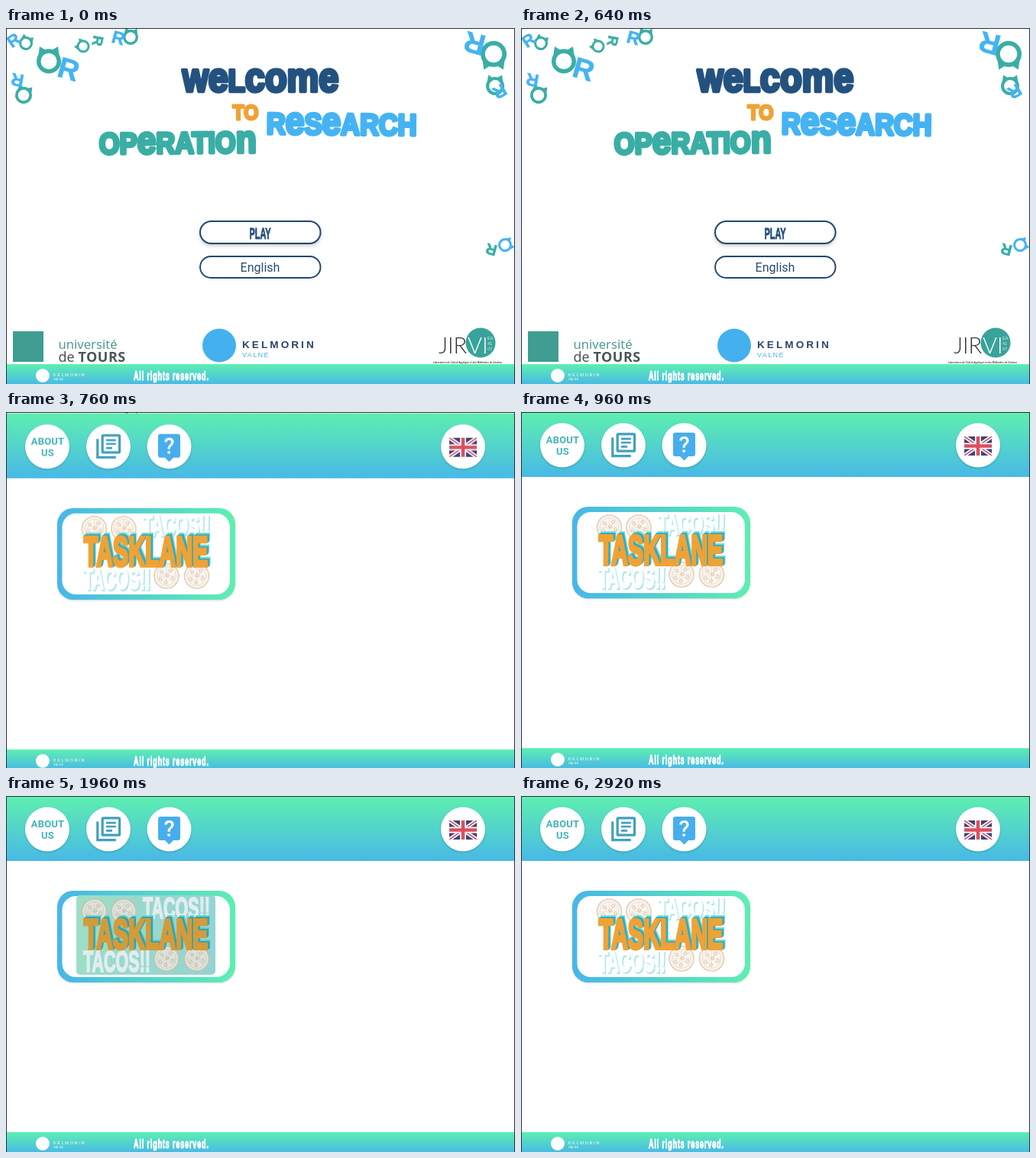
These frames come from a looping animation (666x466 px, 2960 ms). An HTML page:

```html
<!DOCTYPE html>
<html lang="en">
<head>
<meta charset="utf-8">
<title>Welcome</title>
<style>
  html, body { margin: 0; width: 100%; height: 100%; overflow: hidden; background: #fff; }
  svg { display: block; }
  text { font-family: "Liberation Sans", Arial, sans-serif; font-weight: 700; }
  .roboto { font-family: Roboto, sans-serif; }
  .noto { font-family: "Noto Sans", sans-serif; font-weight: 400; }
  .thin { font-family: Lato, sans-serif; font-weight: 300; }
  .plain { font-weight: 400; }
  .display { text-anchor: middle; stroke-linejoin: round; }
  .display .low { font-size: 1.3em; }
  .mid { text-anchor: middle; }
  .lift { filter: drop-shadow(0 1px 1px rgba(0, 0, 0, .22)); }

  .menu { animation: slide 2960ms infinite, appear 2960ms linear infinite; }
  .tint { animation: tint 2960ms linear infinite; }
  .glow { animation: glow 2960ms step-end infinite; }

  @keyframes slide {
    0%, 21.96% { transform: translateY(40px); animation-timing-function: cubic-bezier(.36, .66, .04, 1); }
    28.72%, 100% { transform: none; }
  }
  @keyframes appear {
    0%, 21.96% { opacity: 0; }
    24.6%, 100% { opacity: 1; }
  }
  @keyframes tint {
    0%, 59.5% { opacity: 0; }
    63.5%, 71.6% { opacity: 1; }
    76.4%, 100% { opacity: 0; }
  }
  @keyframes glow {
    0% { opacity: 0; }
    77% { opacity: 1; }
    92% { opacity: 0; }
  }
</style>
</head>
<body>
<svg width="666" height="466" viewBox="0 0 666 466">
  <defs>
    <linearGradient id="bar" x2="0" y2="1">
      <stop stop-color="#5eefb0"/><stop offset="1" stop-color="#48b9e6"/>
    </linearGradient>
    <linearGradient id="rim">
      <stop stop-color="#48b6e8"/><stop offset="1" stop-color="#5eefb0"/>
    </linearGradient>
    <linearGradient id="wash">
      <stop stop-color="#b0eed4"/><stop offset="1" stop-color="#a6e2e6"/>
    </linearGradient>
    <g id="footer">
      <rect x="1" y="440" width="664" height="27" fill="url(#bar)"/>
      <g fill="#fff">
        <circle cx="48" cy="455" r="9"/>
        <text class="plain" x="62" y="456" font-size="5.6" letter-spacing="1.6">KELMORIN</text>
        <text class="plain" x="62" y="460.5" font-size="3.6" letter-spacing=".4">VALNE</text>
      </g>
    </g>
    <g id="pizza">
      <circle r="16" fill="#fbf5ee" stroke="#e3cfba" stroke-width="1.6"/>
      <circle r="12.5" fill="none" stroke="#ecdccb"/>
      <path d="M-12 0H12M0-12V12M-9-9 9 9M9-9-9 9" stroke="#ecdccb" stroke-width=".8"/>
      <g fill="none" stroke="#d9c5b2">
        <circle cx="-6" cy="-5" r="2"/><circle cx="5" cy="-7" r="2"/><circle cx="8" cy="3" r="2"/>
        <circle cx="-1" cy="8" r="2"/><circle cx="-8" cy="4" r="2"/><circle cx="1" cy="-1" r="2"/>
      </g>
    </g>
  </defs>
  <rect width="666" height="466" fill="#fff"/>

  <g id="home">
    <g id="letters"></g>
    <g id="title"></g>
    <g fill="#fff" stroke="#24486f" stroke-width="2">
      <rect x="254" y="253" width="157.5" height="29" rx="14.5" style="filter:drop-shadow(0 2px 2px rgba(0,0,0,.22))"/>
      <rect x="254" y="299" width="157.5" height="28" rx="14"/>
    </g>
    <text class="roboto mid plain" x="332.5" y="319" font-size="16" fill="#2a4a70">English</text>

    <rect x="9" y="397" width="40" height="40" fill="#3f9d91"/>
    <text class="noto" x="68.5" y="420" font-size="16.6" fill="#4d9b91">université</text>
    <text class="noto" x="68.5" y="436.5" font-size="18" fill="#4a5559">de <tspan font-weight="600" letter-spacing=".5">TOURS</tspan></text>

    <circle cx="279" cy="415.5" r="22" fill="#45b0ee"/>
    <text x="309" y="419" font-size="13.5" letter-spacing="3.1" fill="#28456a">KELMORIN</text>
    <text class="plain" x="309" y="431" font-size="9" letter-spacing="1.4" fill="#4bb3ea">VALNE</text>

    <circle cx="621" cy="412" r="19.5" fill="#38a39b"/>
    <g font-size="29">
      <text class="thin" x="566" y="426" fill="#333">JIR</text>
      <text class="thin" x="604" y="426" fill="#fff">VI</text>
    </g>
    <g fill="#d8f0ec" font-size="5.5">
      <text class="plain" x="630" y="408">EA</text><text class="plain" x="630" y="415">41</text>
      <text class="plain" x="630" y="422">07</text>
    </g>
    <text class="mid" x="604" y="438.5" font-size="3.2" fill="#444">Laboratoire de Calcul Appliqué et des Méthodes de Gestion</text>
    <use href="#footer"/>
  </g>

  <g class="menu">
    <rect x="1" width="664" height="467" fill="#fff"/>
    <rect x="1" width="664" height="85" fill="url(#bar)"/>
    <g fill="#fff" class="lift">
      <circle cx="54" cy="43.5" r="29"/><circle cx="134" cy="43.5" r="29"/>
      <circle cx="213.5" cy="43.5" r="29"/><circle cx="598" cy="43.5" r="29"/>
    </g>
    <g class="mid" font-size="13" letter-spacing=".2" fill="#43b5bb">
      <text class="roboto" x="54.5" y="41">ABOUT</text><text class="roboto" x="54.5" y="56">US</text>
    </g>
    <g transform="translate(115 24) scale(1.6)" fill="none" stroke="#419fc0" stroke-width="2">
      <path d="M3 6V21H18"/>
      <rect x="7" y="3" width="14" height="14" rx=".8"/>
      <path d="M10 7H18M10 10H18M10 13.4H15" stroke-width="1.7"/>
    </g>
    <path d="M202 27H225Q228 27 228 30V55Q228 58 225 58H219L213.5 63.5 208 58H202Q199 58 199 55V30Q199 27 202 27Z" fill="#47aeee"/>
    <text class="roboto mid" x="213.5" y="53" font-size="29" fill="#fff" style="font-weight:500">?</text>

    <svg x="580" y="32" width="36" height="25" viewBox="0 0 36 25">
      <rect width="36" height="25" fill="#3c437f"/>
      <path d="M0 0 36 25M36 0 0 25" stroke="#fff" stroke-width="5"/>
      <path d="M0 0 36 25M36 0 0 25" stroke="#d9505f" stroke-width="1.7"/>
      <path d="M18 0V25M0 12.5H36" stroke="#fff" stroke-width="8"/>
      <path d="M18 0V25M0 12.5H36" stroke="#d9505f" stroke-width="4.6"/>
    </svg>

    <rect class="glow" x="67" y="124" width="233" height="120" rx="21" fill="#fff" style="filter:drop-shadow(0 1px 3px rgba(0,0,0,.45))"/>
    <rect x="67" y="124" width="233" height="120" rx="21" fill="url(#rim)" style="filter:drop-shadow(0 1px 1px rgba(0,0,0,.15))"/>
    <rect x="73.5" y="131" width="219.5" height="106" rx="18" fill="#fff"/>
    <rect class="tint" x="92" y="130" width="182" height="104" rx="5" fill="url(#wash)"/>
    <use href="#pizza" x="115.5" y="151"/><use href="#pizza" x="154" y="151"/>
    <use href="#pizza" x="210" y="213"/><use href="#pizza" x="249.5" y="213"/>
    <g id="card"></g>
    <rect class="tint" x="92" y="130" width="182" height="104" rx="5" fill="rgba(20, 110, 95, .12)"/>
    <use href="#footer"/>
  </g>

  <path d="M0 .5H666M.5 0V466M665.5 0V466" stroke="#2c2f33" fill="none"/>
</svg>

<script>
  const NAVY = '#24527f', TEAL = '#3aaea5', BLUE = '#45b3f3', ORANGE = '#f0a235';
  const add = (id, markup) => document.getElementById(id).insertAdjacentHTML('beforeend', markup);

  // Chubby unicase lettering: lowercase letters grow to the height of the capitals.
  function display(text, x, y, size, color, turn = 0) {
    const letters = [...text].map(c =>
      c === c.toLowerCase() ? `<tspan class="low">${c}</tspan>` : c).join('');
    add('title', `<text class="display" transform="translate(${x} ${y}) rotate(${turn}) scale(.88 1)"
      font-size="${size}" fill="${color}" stroke="${color}" stroke-width="${size * .11}">${letters}</text>`);
  }

  // Poster face, shared narrow proportion.
  function poster(id, text, x, y, size, color, { weight = 1, anchor = 'middle', gap = 0 } = {}) {
    add(id, `<text transform="translate(${x} ${y}) scale(.545 1)" font-size="${size}" fill="${color}"
      stroke="${color}" stroke-width="${weight}" text-anchor="${anchor}" letter-spacing="${gap}">${text}</text>`);
  }

  function earedO(x, y, r, color, turn) {
    const w = r * .34;
    add('letters', `<g transform="translate(${x} ${y}) rotate(${turn})">
      <circle r="${r - w / 2}" fill="none" stroke="${color}" stroke-width="${w}"/>
      <path transform="scale(${r})" fill="${color}"
        d="M-.85-.5-.75-1.2-.3-.93ZM.85-.5 .75-1.2 .3-.93Z"/></g>`);
  }

  function letterR(x, y, size, color, turn) {
    add('letters', `<text class="mid" transform="translate(${x} ${y}) rotate(${turn})"
      y="${size * .344}" font-size="${size}" fill="${color}" stroke="${color}" stroke-width=".6">R</text>`);
  }

  // O: x, y, radius, colour, turn; R: x, y, size, colour, turn
  [
    [56, 43.5, 16, TEAL, 0, 82, 54, 38, BLUE, 16],
    [26, 20, 9, TEAL, 20, 10, 16, 22, BLUE, -35],
    [101, 24, 8.5, TEAL, -60, 120, 17, 19, TEAL, 100],
    [163, 12, 10, TEAL, 5, 147, 13, 23, BLUE, 15],
    [23, 88, 11, TEAL, 15, 15, 68, 23, BLUE, 190],
    [638, 34, 17, TEAL, 180, 613, 20, 38, BLUE, 195],
    [640, 76, 12, TEAL, 0, 646, 83, 23, BLUE, 150],
    [653, 284, 9, BLUE, 70, 635, 290, 20, TEAL, 195]
  ].forEach(p => { earedO(...p.slice(0, 5)); letterR(...p.slice(5)); });

  display('WeLcome', 333, 83, 41, NAVY);
  display('TO', 313.5, 120, 28, ORANGE);
  display('OPeRATIOn', 225, 164, 39, TEAL, -.6);
  display('ReSeARCH', 439, 139.5, 39, BLUE, .6);

  poster('home', 'PLAY', 332.5, 276, 20, NAVY);
  poster('footer', 'All rights reserved.', 167, 461, 16.5, '#fff', { weight: 1.2, anchor: 'start', gap: 1.6 });

  // Snack lettering in the background, then the raised name.
  for (const [x, y] of [[223, 160], [145, 230]]) {
    poster('card', 'TACOS!!', x + 1.5, y + 1.5, 39.5, '#a9e6ee', { weight: 2 });
    poster('card', 'TACOS!!', x, y, 39.5, '#fff', { weight: 2 });
  }
  [[3.5, -4, '#7de0df'], [2.5, -2.5, '#35aebb'], [1.2, -1.2, '#35aebb'], [0, 0, ORANGE]]
    .forEach(([dx, dy, color]) =>
      poster('card', 'TASKLANE', 183 + dx, 200 + dy, 55.5, color, { weight: 4 }));
</script>
</body>
</html>
```
